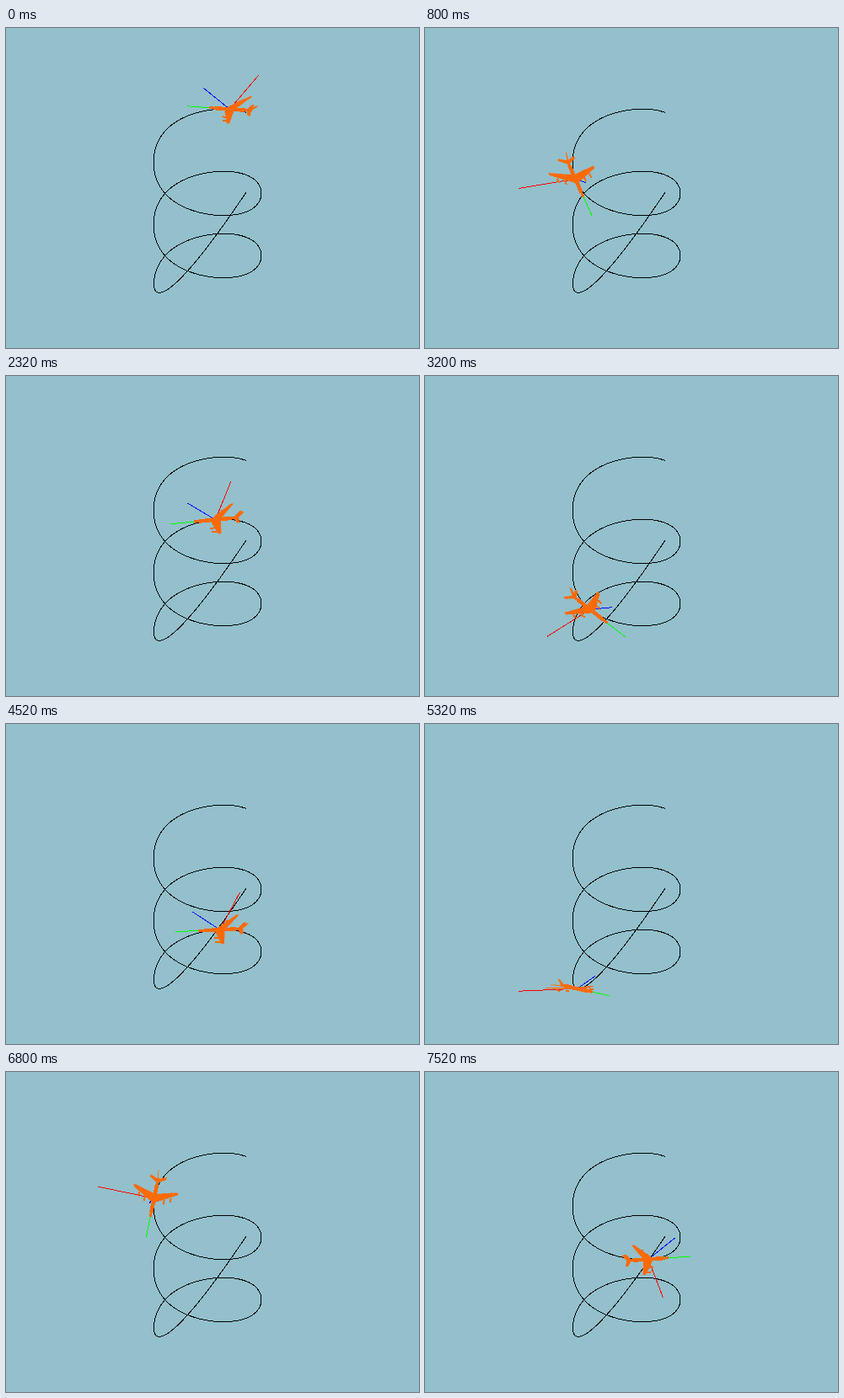
An HTML page for the animation above (7600 ms loop, 490 px wide and 380 px high).

```html
<!DOCTYPE html>
<html lang="en">
<head>
<meta charset="utf-8">
<title>Plane on a helix</title>
<style>
  html, body { margin: 0; width: 100%; height: 100%; overflow: hidden; background: #93c0cb; }
  svg { display: block; shape-rendering: crispEdges; }
  path { fill: none; stroke-width: 1; }
  #plane { fill: #ff6a00; stroke: #ff6a00; stroke-width: .4; }
  #body, #nose, #engines { stroke: #ff6a00; }
</style>
</head>
<body>
<svg width="490" height="380" viewBox="0 0 490 380">
  <path id="route" stroke="#000"/>
  <path id="side" stroke="#f00"/>
  <path id="ahead" stroke="#0f0"/>
  <path id="up" stroke="#00f"/>
  <path id="plane"/>
  <path id="body" style="stroke-width:4.5"/>
  <path id="nose" style="stroke-width:3"/>
  <path id="engines" style="stroke-width:2"/>
</svg>
<script>
const LOOP = 7600, RESTART = 6040, LAP = 6180;
const CLIMB_AT = 5080, CLIMB_TIME = RESTART - CLIMB_AT;
const START = 0.82, END = 15.6, TILT = 0.667, AXIS = 70, LAG = 0.13;
const CLIMB = [[175.4, 301.5], [174, 331], [204, 316], [285, 195]];

// The picture advances in uneven steps: [first, last, count] of each run, in ms.
const RUNS = [
  [40, 800, 11], [840, 1520, 11], [1640, 2400, 12], [2440, 3200, 12], [3320, 4040, 12],
  [4120, 4840, 11], [5000, 5720, 12], [5800, 6520, 12], [6600, 7320, 11], [7400, 7520, 3]
];
const steps = [0];
for (const [first, last, count] of RUNS)
  for (let i = 0; i < count; i++)
    steps.push(Math.floor((first + (last - first) * i / (count - 1)) / 40 + 1e-6) * 40);

const { sin, cos, hypot } = Math;
const setPath = (id, d) => document.getElementById(id).setAttribute('d', d);
const text = points => points.map(p => p.map(n => n.toFixed(2)).join(' ')).join('L');
const line = (...points) => 'M' + text(points);
const shape = (...points) => line(...points) + 'Z';

// Slightly fuller than a true circle, as a spline through few points is.
const helix = a => [
  239 + 64 * (1.027 * cos(a) - 0.027 * cos(3 * a)),
  122.4 + 11.78 * a - 43.1 * sin(a)
];
const outward = a => [AXIS * cos(a), -AXIS * TILT * sin(a)];

function climb(s) {
  const r = 1 - s, w = [r * r * r, 3 * r * r * s, 3 * r * s * s, s * s * s];
  return [0, 1].map(k => CLIMB.reduce((sum, p, i) => sum + p[k] * w[i], 0));
}

function climbSlope(s) {
  const r = 1 - s, w = [r * r, 2 * r * s, s * s];
  return [0, 1].map(k => w.reduce((sum, n, i) => sum + n * (CLIMB[i + 1][k] - CLIMB[i][k]), 0));
}

// Position with the side, ahead and lift vectors on screen.
function poseAt(ms) {
  if (ms >= RESTART) ms -= LAP;
  if (ms < CLIMB_AT) {
    const turn = 1.175 + 2.82 * ms / 1000;
    const a = turn + 0.07 * (1 - cos(turn - 1.7));
    return {
      pos: helix(a),
      side: outward(a - LAG),
      ahead: [-54.4 * sin(a), 10 - 36.3 * cos(a)],
      lift: [0, -23]
    };
  }
  const s = (ms - CLIMB_AT) / CLIMB_TIME;
  const [dx, dy] = climbSlope(s), scale = 56 / (hypot(dx, dy) + 7);
  return {
    pos: climb(s),
    side: outward(END - LAG + 1.2 * Math.min(s, 0.75)),
    ahead: [dx * scale, dy * scale],
    lift: [-8 * s, -23 + 11 * s]
  };
}

function draw(ms) {
  const { pos, side, ahead, lift } = poseAt(ms);
  const at = (f, r = 0, u = 0) => [0, 1].map(k => pos[k] + f * ahead[k] + r * side[k] + u * lift[k]);
  const both = make => make(1) + make(-1);

  setPath('side', line(pos, at(0, 1)));
  setPath('ahead', line(pos, at(1)));
  setPath('up', line(pos, at(0.62, 0, 1)));

  const wing = d => shape(at(0.12), at(-0.2, 0.39 * d), at(-0.26, 0.39 * d), at(-0.11));
  const tail = d => shape(at(-0.4), at(-0.52, 0.14 * d), at(-0.58, 0.14 * d), at(-0.5));
  const fin = shape(at(-0.38), at(-0.53, 0, 0.32), at(-0.58, 0, 0.32), at(-0.5));
  setPath('plane', both(wing) + both(tail) + fin);
  setPath('body', line(at(0.36), at(-0.36)));
  setPath('nose', line(at(0.48), at(-0.52)));
  setPath('engines', both(d => line(at(0.06, 0.17 * d, -0.1), at(-0.06, 0.17 * d, -0.1)) +
    line(at(-0.02, 0.28 * d, -0.1), at(-0.14, 0.28 * d, -0.1))));
}

const route = [];
for (let i = 0; i <= 240; i++) route.push(helix(START + (END - START) * i / 240));
setPath('route', line(...route) + 'L' + text([CLIMB[0]]) + 'C' + CLIMB.slice(1).join(' '));

const origin = performance.now();
function tick() {
  const ms = (performance.now() - origin) % LOOP;
  draw(steps.findLast(step => step <= ms));
  requestAnimationFrame(tick);
}
draw(0);
requestAnimationFrame(tick);
</script>
</body>
</html>
```
